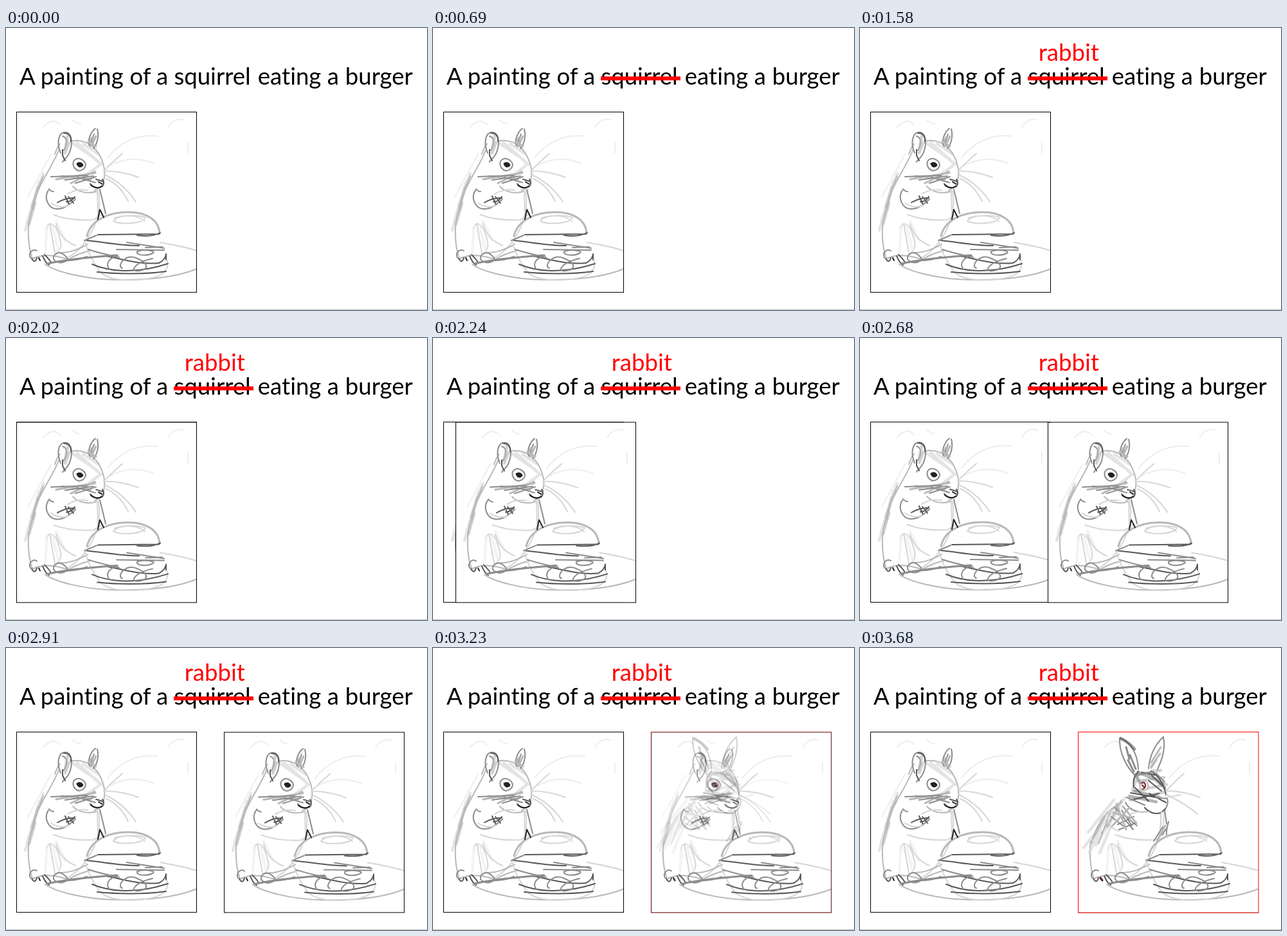
Recreate the animation shown at these times as an HTML page. Size 655 px wide and 438 px high, loop 4.26 s.

```html
<!DOCTYPE html>
<html lang="en">
<head>
<meta charset="utf-8">
<title>Prompt edit</title>
<style>
html, body { margin: 0; width: 100%; height: 100%; overflow: hidden; background: #fff; }
svg { display: block; width: 100%; height: 100%; }
text { font: 36.6px Lato, "Open Sans", sans-serif; font-variant-ligatures: none; }
path { fill: none; stroke-linecap: round; stroke-linejoin: round; stroke-width: 2; }
.faint { stroke: #eee; }
.pale { stroke: #d6d6d6; }
.soft { stroke: #b8b8b8; }
.mid { stroke: #8c8c8c; }
.dark { stroke: #585858; }
.ink { stroke: #222; }
.wide { stroke-width: 4.5; stroke-opacity: .65; }
.bold { stroke-width: 3; }
.frame { fill: none; stroke: #000; }
.red { stroke: #f00; }
</style>
</head>
<body>
<svg viewBox="0 0 655 438">
<defs>
  <clipPath id="inside"><rect x="17" y="131" width="279" height="279"/></clipPath>
  <clipPath id="wipeStrike"><rect id="strikeClip" x="261" y="70" height="16"/></clipPath>
  <clipPath id="wipeWord"><rect id="wordClip" x="277" y="15" height="50"/></clipPath>

  <g id="burger">
    <path class="soft" d="M61 367C76 378 120 390 170 391S263 388 297 374"/>
    <path class="pale" d="M240 333C256 336 280 340 297 346M124 334C127 348 136 364 146 378C156 390 182 393 206 391C236 389 254 382 251 362"/>
    <path class="soft bold" d="M126 323C132 298 160 286 190 286S238 299 239 319"/>
    <path class="pale" d="M167 300C172 291 200 289 217 294C214 304 180 306 167 300M169 295C184 290 205 290 216 300"/>
    <path class="dark" d="M143 321L238 320M204 322Q228 325 240 318M126 330C150 332 175 338 207 338"/>
    <path class="mid" d="M122 330L141 322M188 333L246 342M172 344L246 345M217 341L243 340M128 344Q150 351 176 356"/>
    <path class="dark" d="M134 367C160 378 200 383 252 366M142 379C170 382 215 383 249 378M155 354C182 359 208 368 238 365Q248 360 249 351V360"/>
    <path class="mid" d="M204 347C214 343 236 346 228 350S202 354 204 347M181 373C172 371 184 350 202 357S225 374 208 377S198 365 228 358M161 375C154 366 160 358 174 353"/>
    <path class="mid bold" d="M65 366Q98 358 172 353"/>
  </g>

  <g id="lower">
    <path class="pale" d="M144 254C148 276 143 304 126 328C116 344 105 352 94 358M63 312C64 300 76 302 81 318S89 340 78 352"/>
    <path class="faint wide" d="M64 308L61 348M72 306L82 346M78 300L92 330"/>
    <path class="pale" d="M74 290Q100 300 136 298L150 289M78 304Q84 328 108 338M68 304L76 349"/>
    <path class="soft" d="M36 300C33 322 36 344 41 358M82 349C98 350 112 344 127 336M96 360Q112 350 130 346M42 358Q64 347 101 361"/>
    <path class="mid" d="M38 357C34 349 42 342 48 346M74 359C73 350 83 346 90 352S98 360 91 363S78 364 74 359M92 361Q108 362 126 355"/>
    <path class="dark" d="M40 358Q45 367 48 357M57 354Q62 366 67 368M60 352Q70 362 70 365"/>
  </g>

  <g id="squirrel">
    <path class="faint" d="M58 154Q72 138 84 150M104 143Q112 150 116 148M70 196L34 262M252 154Q262 138 276 143M283 178V194M158 202C176 178 204 164 236 168M162 214Q194 196 230 210"/>
    <path class="pale wide" d="M52 238L33 302M58 226L40 276M44 270L30 314"/>
    <path class="soft" d="M82 190C72 216 48 246 42 276Q37 290 35 306M58 230Q48 250 42 282"/>
    <path class="soft wide" d="M50 248L41 278M45 272L36 304"/>
    <path class="pale wide" d="M102 178L140 204M110 178L148 212M120 180L144 196M128 226L144 214"/>
    <path class="soft" d="M101 176C114 172 128 178 136 185C148 197 155 216 153 231S147 248 138 252M104 246C112 255 128 258 140 254M76 196Q80 184 84 180"/>
    <path class="mid" d="M85 194C78 178 82 162 92 162S104 177 100 190S91 202 88 208M88 168C96 170 96 181 90 190"/>
    <path class="dark" d="M90 163Q102 164 101 176M88 189V198L92 206"/>
    <path class="soft wide" d="M96 168L92 188M98 178L92 194"/>
    <path class="mid" d="M130 183C126 174 133 160 139 156M142 157C145 168 142 180 136 187M137 165L132 179M140 168L134 182"/>
    <path class="soft bold" d="M139 170L132 184M134 170L129 178M128 176L140 184"/>
    <path class="mid" d="M105 214C102 204 112 200 119 205S125 216 119 220S107 220 105 214"/>
    <path class="ink bold" d="M111 211Q116 208 119 213Q114 218 111 211L118 214"/>
    <path class="soft bold" d="M78 235L139 225M86 230L132 235M101 241L138 223"/>
    <path class="mid" d="M70 231L126 229M92 236L136 230M108 241L140 231M111 232L139 240"/>
    <path class="dark" d="M131 242Q140 252 150 246Q154 241 150 235M140 235L150 238"/>
    <path class="ink" d="M132 244Q141 251 149 246M144 239L149 242"/>
    <path class="pale" d="M152 222Q168 206 181 195M153 222Q180 222 206 232M154 228Q184 242 202 270M156 234Q178 244 190 269"/>
    <path class="mid" d="M66 252C58 264 66 280 78 281S99 274 108 266M67 250Q70 254 74 254"/>
    <path class="dark" d="M80 271Q94 263 107 264M92 261L98 274M97 262L105 272M94 270Q102 270 107 262"/>
    <path class="pale" d="M96 258Q110 249 127 252M70 272Q86 282 99 275M142 252L143 292"/>
    <path class="mid" d="M146 251L155 288"/>
    <path class="ink" d="M143 297L146 282L152 294M51 357L53 361"/>
  </g>

  <g id="rabbit">
    <path class="faint" d="M58 154Q72 138 84 150M252 154Q262 138 276 143M283 178V194M158 202C176 178 204 164 236 168"/>
    <path class="pale wide" d="M72 236L32 286M81 240L25 310M62 256L34 318M80 250L46 302M54 260L44 306M67 278L50 318M90 232L58 278"/>
    <path class="soft" d="M84 240C58 252 42 280 37 304M76 246Q50 260 45 288M84 236L62 278M68 250L48 304M78 250L52 288M58 262L39 298"/>
    <path class="mid" d="M81 140C80 162 91 184 105 198M82 139C98 147 109 164 110 188M149 138C137 149 128 166 126 187M149 139C153 157 146 176 139 190"/>
    <path class="dark wide" d="M83 141Q95 146 104 157"/>
    <path class="mid bold" d="M94 174L103 192M97 166L106 188M91 154L96 172"/>
    <path class="soft bold" d="M145 154L130 178M144 164L130 184M138 174L130 186"/>
    <path class="soft wide" d="M104 198L145 190M106 207L150 201M104 222L154 212M97 236L149 224M110 192L101 222M134 190L153 222"/>
    <path class="mid wide" d="M106 196L114 212M110 193L149 210M126 195L151 217M96 230L138 239M104 222L143 232"/>
    <path class="dark" d="M110 192Q100 202 103 216M115 193L140 198M130 191Q149 204 153 228M98 225L137 232M100 236L142 226M105 217L126 238M127 226L153 240M131 198L148 214M126 206L146 222"/>
    <path class="mid" d="M106 198L133 192M92 232L120 244M137 232L155 234Q158 244 149 253M90 240Q100 258 125 254M138 195L151 208"/>
    <path class="dark" d="M120 248Q131 260 145 256L152 250"/>
    <ellipse cx="119" cy="214" rx="6.5" ry="7.5" fill="#eee" stroke="#888"/>
    <path d="M115 210Q120 207 121 213Q121 218 117 219M116 213L119 216" stroke="#842528"/>
    <path class="pale" d="M153 222Q168 206 181 195M153 222Q180 222 206 232M154 228Q184 242 202 258M154 232L176 228"/>
    <path class="mid" d="M74 248L102 282M78 274L103 262M84 252L100 276M80 282L105 272M88 260L108 276M68 262L91 280"/>
    <path class="soft bold" d="M76 242L91 282M96 248L68 278M86 246L107 272M71 256L99 264"/>
    <path class="pale" d="M66 252C58 264 66 282 80 284M97 258Q112 252 127 255M146 254L143 294M150 256L148 286"/>
    <path class="mid" d="M151 252L154 273M157 270Q153 284 154 290M148 278L134 300M154 280L147 290"/>
    <path class="soft bold" d="M152 276L139 300"/>
    <path class="bold" d="M51 357L54 361" stroke="#5a1c20"/>
  </g>

  <g id="first">
    <rect x="16.5" y="130.5" width="280" height="280" fill="#fff"/>
    <g clip-path="url(#inside)"><use href="#lower"/><use href="#burger"/><use href="#squirrel"/></g>
    <rect class="frame" x="16.5" y="130.5" width="280" height="280"/>
  </g>
  <g id="second">
    <rect x="16.5" y="130.5" width="280.5" height="280.5" fill="#fff"/>
    <g clip-path="url(#inside)"><use href="#lower"/><use href="#burger"/><use href="#rabbit"/></g>
    <rect class="frame red" x="16.5" y="130.5" width="280.5" height="280.5"/>
  </g>
</defs>

<rect width="655" height="438" fill="#fff"/>
<rect y="437" width="655" height="1" fill="#bfbfbf"/>
<text y="88"><tspan x="21">A</tspan> <tspan x="53.8">painting</tspan> <tspan x="192.4">of</tspan> <tspan x="234">a</tspan> <tspan x="261.4">squirrel</tspan> <tspan x="391.8">eating</tspan> <tspan x="499.8">a</tspan> <tspan x="527.8">burger</tspan></text>
<rect x="261" y="75.3" width="124" height="6" fill="#f00" clip-path="url(#wipeStrike)"/>
<text x="277.8" y="51" fill="#f00" clip-path="url(#wipeWord)">rabbit</text>
<use href="#first"/>
<use id="copy" href="#first"/>
<use id="edited" href="#second"/>
</svg>
<script>
const LOOP = 4260, TRAVEL = 323;
const set = (id, name, value) => document.getElementById(id).setAttribute(name, value);

// Number of steps taken so far: the first at `from`, the last at `to`.
function stepsAt(t, from, to, count) {
  if (t < from) return 0;
  return Math.min(count, 1 + Math.floor((t - from) * (count - 1) / (to - from)));
}

const clamp = x => Math.max(0, Math.min(1, x));
const ease = u => (1 - Math.cos(Math.PI * clamp(u))) / 2;

function draw(t) {
  const strike = stepsAt(t, 460, 690, 3) / 3;
  const word = stepsAt(t, 1120, 1580, 5) / 5;
  const slide = stepsAt(t, 2020, 2450, 5) + stepsAt(t, 2560, 2910, 4);
  const blend = stepsAt(t, 3230, 3680, 5);
  const shift = Math.round(TRAVEL * ease((slide - 1.95) / 6.72));

  set("strikeClip", "width", 124 * strike);
  set("wordClip", "width", 98 * word);
  set("copy", "visibility", slide ? "visible" : "hidden");
  set("copy", "transform", `translate(${shift} 0.4)`);
  set("edited", "transform", `translate(${shift} 0)`);
  set("edited", "opacity", blend ? 0.25 + 0.15 * blend : 0);
}

const start = performance.now();
function tick() {
  draw((performance.now() - start) % LOOP);
  requestAnimationFrame(tick);
}
tick();
</script>
</body>
</html>
```
